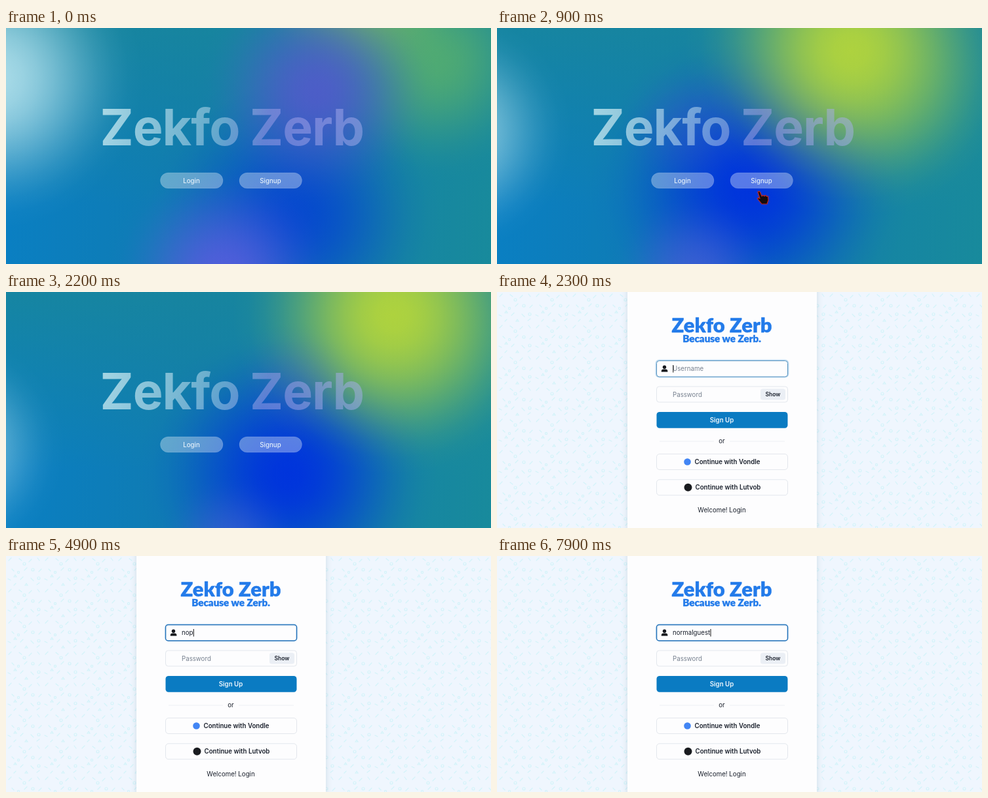
These frames come from a looping animation (740x362 px, 8 s). An HTML page:

```html
<!DOCTYPE html>
<html lang="en">
<head>
<meta charset="utf-8">
<title>Sign up</title>
<style>
  html, body { margin: 0; width: 100%; height: 100%; overflow: hidden; }
  svg { display: block; width: 100vw; height: 100vh; font: 9.7px Inter, sans-serif; }
  .mid { text-anchor: middle; }
  .bold { font-weight: 600; }
  .hero { font-size: 77px; font-weight: 700; letter-spacing: -1px; fill: url(#ink); }
  .brand { font-family: Lato, sans-serif; font-weight: 900; fill: #237bea; stroke: #237bea; stroke-width: .4; stroke-linejoin: round; }
  .box { fill: #fdfdfe; stroke: #e3e7ed; }
  .pill { fill: #fff; fill-opacity: .34; stroke: #fff; stroke-opacity: .12; }
</style>
</head>
<body>
<svg viewBox="0 0 740 362" preserveAspectRatio="none">
  <defs id="defs">
    <linearGradient id="base">
      <stop offset="0" stop-color="#0a7fc2"/>
      <stop offset=".4" stop-color="#107bb0"/>
      <stop offset="1" stop-color="#188a9c"/>
    </linearGradient>
    <linearGradient id="teal" x2="0" y2="1">
      <stop offset="0" stop-color="#18869c" stop-opacity=".85"/>
      <stop offset=".75" stop-color="#18869c" stop-opacity="0"/>
    </linearGradient>
    <linearGradient id="ink" gradientUnits="userSpaceOnUse" x1="150" y1="115" x2="545" y2="190">
      <stop offset="0" stop-color="#dcf5f8" stop-opacity=".72"/>
      <stop offset=".45" stop-color="#c4e0f2" stop-opacity=".46"/>
      <stop offset=".62" stop-color="#a5a0ea" stop-opacity=".5"/>
      <stop offset="1" stop-color="#a9b0ee" stop-opacity=".5"/>
    </linearGradient>
    <pattern id="marks" width="56" height="48" patternUnits="userSpaceOnUse">
      <g fill="none" stroke="#d3f3f9" stroke-width="1.2" stroke-linecap="round">
        <path d="M4 7l4-4M20 4l4 3M35 9l4-4M48 3l3 4M9 20l3 3M28 22l4-4M50 24l4-4M3 35l4 2M22 36l4-4M38 34l4 4M12 45l3-3M47 44l4-3"/>
        <circle cx="28" cy="12" r="2"/><circle cx="19" cy="25" r="1.6"/>
        <circle cx="41" cy="21" r="2"/><circle cx="50" cy="34" r="2"/>
        <path d="M12 32l2-3 2 3zM29 45l2-3 2 3z"/>
      </g>
    </pattern>
    <filter id="shade" x="-20%" width="140%"><feGaussianBlur stdDeviation="5"/></filter>
  </defs>

  <g id="landing">
    <rect width="740" height="362" fill="url(#base)"/>
    <rect width="740" height="362" fill="url(#teal)"/>
    <g id="blobs"></g>
    <text class="hero" x="143.500" y="180">Zekfo</text>
    <text class="hero" x="372" y="180">Zerb</text>
    <rect class="pill" x="235.500" y="222" width="95.500" height="24" rx="12"/>
    <rect class="pill" x="356" y="222" width="95.500" height="24" rx="12"/>
    <g class="mid" fill="#e6f1fa" font-weight="500">
      <text x="283" y="237.500">Login</text>
      <text x="403.500" y="237.500">Signup</text>
    </g>
    <g id="cursor" stroke="#c8281e" stroke-width="1.2" stroke-linejoin="round" fill="#140c0e">
      <path id="arrow" d="M0 0V17L4 13.500L7.500 21L10.500 19.500L7.500 12.500H12Z"/>
      <path id="hand" d="M1 1.500C2 0 4 .5 4.500 2L7 8L9 6.500L11 8L13 6.500L14.500 8.500L16.500 8L17 14L15 20H7L1 12.500C0 10.500 2.500 10 4 11.500Z"/>
    </g>
  </g>

  <g id="form">
    <rect width="740" height="362" fill="#eff6fe"/>
    <rect width="740" height="362" fill="url(#marks)"/>
    <rect x="199" y="-20" width="289" height="402" fill="#8fa5b8" opacity=".35" filter="url(#shade)"/>
    <rect x="199" width="289" height="362" fill="#fdfdfe"/>
    <g class="mid brand">
      <text x="343" y="61.500" font-size="31">Zekfo Zerb</text>
      <text x="343" y="76.500" font-size="15.200">Because we Zerb.</text>
    </g>

    <rect id="glow" x="242.500" y="104.500" width="202" height="26" rx="5" fill="none" stroke="#a8d0ee" stroke-width="2"/>
    <rect id="field" class="box" x="243.500" y="105.500" width="200" height="24.500" rx="4"/>
    <g fill="#15181d">
      <circle cx="255.500" cy="115.200" r="2.700"/>
      <path d="M250.800 122.500v-1q0-3 3-3h3.600q3 0 3 3v1z"/>
      <rect x="251.500" y="156" width="8.500" height="6" rx="1"/>
      <path d="M253.300 156.500v-1.700a2.400 2.400 0 0 1 4.900 0v1.700" fill="none" stroke="#15181d" stroke-width="1.400"/>
    </g>
    <text id="hint" x="268" y="121.300" fill="#77808f">Username</text>
    <text id="typed" x="268" y="121.300" fill="#1a202c"></text>
    <rect id="caret" y="112" width="1" height="11.500" fill="#111"/>

    <rect class="box" x="243.500" y="145" width="200" height="24" rx="4"/>
    <g fill="#77808f"><text x="268" y="160.700">Password</text></g>
    <rect x="402" y="148.500" width="38" height="17" rx="3.500" fill="#ebeff5"/>
    <text class="mid bold" x="421" y="160" font-size="8.500" fill="#1a202c">Show</text>

    <rect x="243.500" y="184" width="200" height="24.700" rx="4.500" fill="#0a7bc2"/>
    <text class="mid bold" x="343" y="199.700" fill="#eef6fc">Sign Up</text>
    <path d="M248 229H331M355 229H439" stroke="#e9ecf0" stroke-width=".8"/>
    <g fill="#1a202c">
      <text class="mid" x="343" y="232.300">or</text>
      <rect class="box" x="243.500" y="248.500" width="200" height="24" rx="4.500"/>
      <rect class="box" x="243.500" y="287.800" width="200" height="24" rx="4.500"/>
      <text class="bold" x="301.500" y="263.700">Continue with Vondle</text>
      <text class="bold" x="302.500" y="303.200">Continue with Lutvob</text>
      <text class="mid" x="343" y="338">Welcome! Login</text>
    </g>
    <circle cx="290.500" cy="260.500" r="5.300" fill="#4285f4"/>
    <circle cx="291.500" cy="299.800" r="6" fill="#191b1f"/>
  </g>
</svg>
<script>
const LOOP = 8000, STEP = 100, CUT = 2300;
const NS = 'http://www.w3.org/2000/svg';
const $ = id => document.getElementById(id);

function add(parent, tag, attrs) {
  const el = document.createElementNS(NS, tag);
  set(el, attrs);
  return parent.appendChild(el);
}
function set(el, attrs) {
  for (const k in attrs) el.setAttribute(k, attrs[k]);
}
const show = (el, on) => el.setAttribute('visibility', on ? 'inherit' : 'hidden');

// Linear blend between rows of values placed at the given times
function blend(times, rows, t) {
  let i = 0;
  while (i < times.length - 2 && t >= times[i + 1]) i++;
  const k = Math.max(0, Math.min(1, (t - times[i]) / (times[i + 1] - times[i])));
  return rows[i].map((v, j) => v + (rows[i + 1][j] - v) * k);
}

// Each drifting light: colour, then x, y, radius, opacity at each time
const driftTimes = [0, 400, 900, 2200];
const lights = [
  ['#58b06c', [655, 50, 185, .85], [660, 80, 175, .6], [625, 110, 180, .3], [645, 95, 200, .3]],
  ['#0034dc', [440, 285, 225, .72], [420, 260, 240, .95], [385, 245, 245, 1], [430, 280, 230, 1]],
  ['#b5d63a', [540, -70, 170, .6], [545, -5, 200, .78], [540, 35, 255, .95], [590, 35, 245, .95]],
  ['#5a55d0', [475, 95, 185, .8], [390, 110, 150, .55], [290, 150, 110, .22], [440, 140, 100, .18]],
  ['#5c5ce0', [330, 380, 175, .85], [300, 375, 145, .6], [300, 378, 130, .55], [340, 385, 110, .42]],
  ['#b8e4ee', [-20, 78, 230, .9], [-45, 110, 200, .72], [-70, 160, 185, .75], [-85, 240, 175, .7]]
].map(([color, ...rows], n) => {
  const grad = add($('defs'), 'radialGradient', { id: 'light' + n });
  for (let i = 0; i <= 10; i++) {
    const fade = (1 + Math.cos(Math.PI * i / 10)) / 2;
    add(grad, 'stop', { offset: i / 10, 'stop-color': color, 'stop-opacity': fade });
  }
  return { rows, el: add($('blobs'), 'circle', { fill: `url(#light${n})` }) };
});

const pathTimes = [200, 400, 600, 800];
const path = [[434, 368], [424, 331], [406, 278], [397, 250]];

// Key presses: time and the number of letters then standing
const user = 'normalguest';
const keys = [[3500, 1], [4500, 2], [4900, 'nop'], [5200, 2], [5400, 3], [5600, 4],
  [5800, 5], [6000, 6], [6100, 7], [6700, 8], [7600, 9], [7800, 10], [7900, 11]];

function drawLanding(t) {
  for (const { rows, el } of lights) {
    const [cx, cy, r, opacity] = blend(driftTimes, rows, t);
    set(el, { cx, cy, r, opacity });
  }
  const [x, y] = blend(pathTimes, path, t);
  set($('cursor'), { transform: `translate(${x} ${y})` });
  show($('cursor'), t >= 300 && t < 1900);
  show($('arrow'), t < 800);
  show($('hand'), t >= 800);
}

function drawForm(t) {
  const [time, value] = keys.filter(k => k[0] <= t).pop() || [CUT, 0];
  const text = typeof value === 'string' ? value : user.slice(0, value);
  const typed = $('typed');
  typed.textContent = text;
  show($('hint'), !text);
  const end = text ? typed.getComputedTextLength() : 0;
  set($('caret'), { x: 268.3 + end });
  show($('caret'), Math.floor((t - time) / 500) % 2 === 0);

  const [width, glow, r, g, b] = blend([CUT, CUT + 200], [[1, .7, 84, 145, 190], [1.5, .25, 32, 112, 184]], t);
  $('field').style.cssText = `stroke:rgb(${r},${g},${b});stroke-width:${width}`;
  set($('glow'), { opacity: glow });
}

function render(ms) {
  const t = Math.floor(ms % LOOP / STEP) * STEP;
  const onForm = t >= CUT;
  show($('landing'), !onForm);
  show($('form'), onForm);
  if (onForm) drawForm(t);
  else drawLanding(t);
}

const start = performance.now();
function tick() {
  render(performance.now() - start);
  requestAnimationFrame(tick);
}
tick();
</script>
</body>
</html>
```
